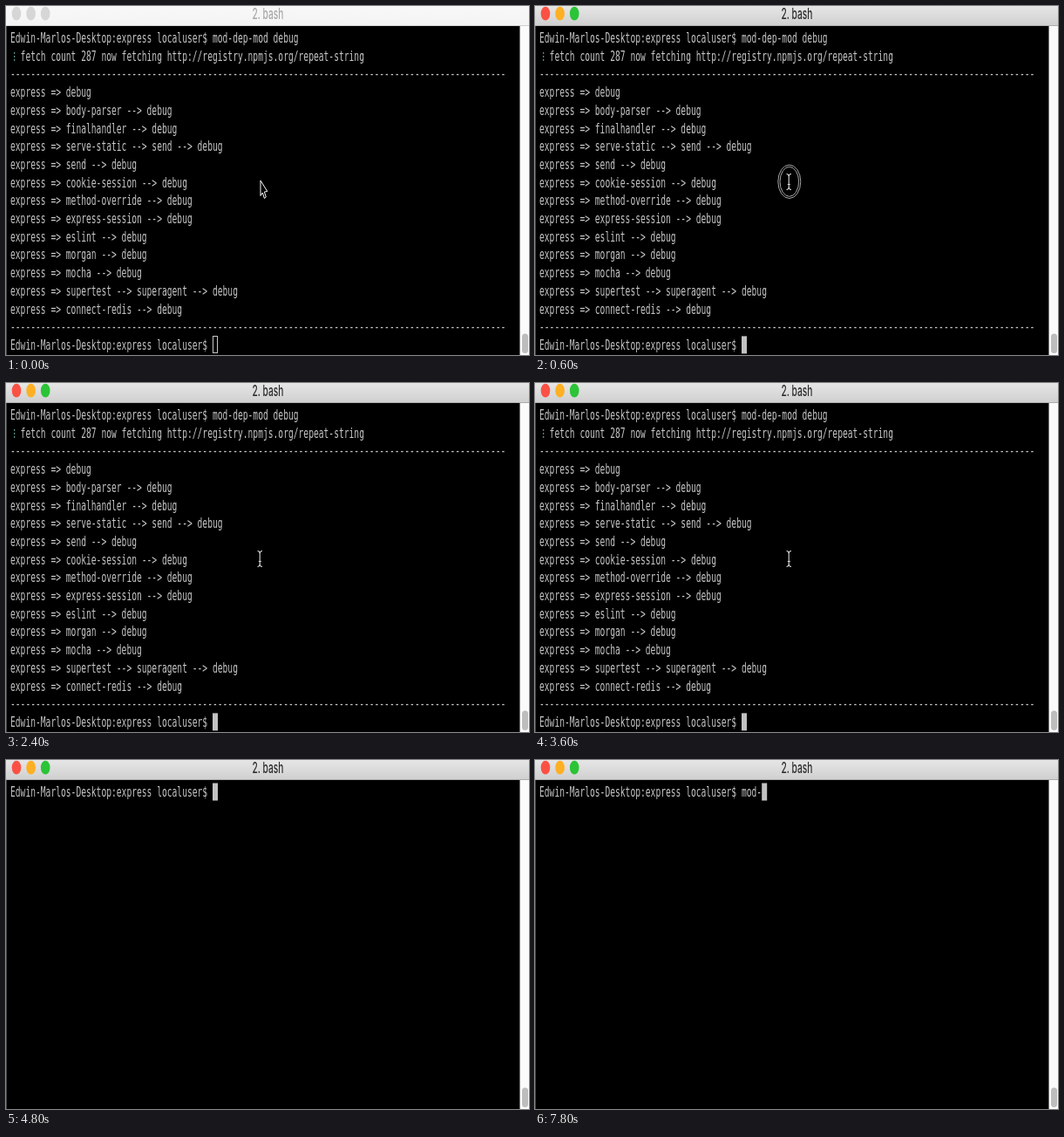
Animation, 600 px wide and 400 px high, one loop 8 s. Source, as an HTML page with a canvas:

```html
<!DOCTYPE html>
<html>
<head>
<meta charset="utf-8">
<style>
html, body { margin: 0; width: 100%; height: 100%; overflow: hidden; background: #000; }
canvas { display: block; }
</style>
</head>
<body>
<canvas id="stage" width="600" height="400"></canvas>
<script>
const ctx = document.getElementById('stage').getContext('2d');
const LOOP = 8000, LEFT = 5, COL = 5.8, ROW = 20.7, NARROW = 0.602;
const INK = '#c6c6c6', PALE = '#fbfbfb';
const MONO = '16px "DejaVu Sans Mono", monospace';
const SANS = '500 17px Inter, sans-serif';
const PROMPT = 'Edwin-Marlos-Desktop:express localuser$ ';
const RULE = '-'.repeat(98);
const PATHS = [
  'debug', 'body-parser --> debug', 'finalhandler --> debug',
  'serve-static --> send --> debug', 'send --> debug',
  'cookie-session --> debug', 'method-override --> debug',
  'express-session --> debug', 'eslint --> debug', 'morgan --> debug',
  'mocha --> debug', 'supertest --> superagent --> debug',
  'connect-redis --> debug'
];
const OUTPUT = [
  PROMPT + 'mod-dep-mod debug',
  '  fetch count 287 now fetching http://registry.npmjs.org/repeat-string',
  RULE, ...PATHS.map(p => 'express => ' + p), RULE
];
const KEY_TIMES = [6200, 6400, 6600, 7400];

function rect(x, y, w, h, color) {
  ctx.fillStyle = color;
  ctx.fillRect(x, y, w, h);
}

function ellipse(x, y, rx, ry) {
  ctx.beginPath();
  ctx.ellipse(x, y, rx, ry, 0, 0, 7);
}

function text(str, x, y, font, color, align = 'left') {
  ctx.save();
  ctx.translate(x, y);
  ctx.scale(NARROW, 1);
  ctx.font = font;
  ctx.fillStyle = color;
  ctx.textAlign = align;
  ctx.fillText(str, 0, 0);
  ctx.restore();
}

function titleBar(active) {
  const shade = ctx.createLinearGradient(0, 0, 0, 22);
  shade.addColorStop(0, active ? '#e6e6e6' : '#f8f8f8');
  shade.addColorStop(1, active ? '#d0d0d0' : '#f4f4f4');
  rect(0, 0, 600, 22, shade);
  rect(0, 22, 600, 1, active ? '#acacac' : '#d0d0d0');
  const lights = active ? ['#fb5145', '#fdb024', '#2bc437'] : Array(3).fill('#d6d6d6');
  lights.forEach((color, i) => {
    ellipse(12 + i * 16.6, 8.7, 5.3, 7.9);
    ctx.fillStyle = color;
    ctx.fill();
  });
  text('2. bash', 300.5, 14.7, SANS, active ? '#2c2c2c' : '#a8a8a8', 'center');
}

function scrollBar() {
  rect(589.5, 23, 10.5, 377, PALE);
  ctx.fillStyle = '#bdbdbd';
  ctx.beginPath();
  ctx.roundRect(592, 375.5, 7, 22.5, 3.5);
  ctx.fill();
}

function caret(col, row, filled) {
  const x = LEFT + col * COL, y = 26.5 + row * ROW;
  if (filled) return rect(x, y, 6, 20, '#c2c2c2');
  ctx.strokeStyle = INK;
  ctx.lineWidth = 1;
  ctx.strokeRect(Math.round(x) + .5, Math.round(y) + .5, 5, 19);
}

function arrow() {
  ctx.beginPath();
  [[292, 200], [292, 217.5], [294.4, 214], [296.4, 220.5], [298.3, 219], [296.4, 213], [299.8, 212.5]]
    .forEach(p => ctx.lineTo(...p));
  ctx.closePath();
  ctx.fillStyle = '#000';
  ctx.fill();
  ctx.strokeStyle = PALE;
  ctx.lineWidth = 1;
  ctx.stroke();
}

function iBeam() {
  ctx.strokeStyle = '#dadada';
  ctx.lineWidth = 1.1;
  ctx.stroke(new Path2D('M288.5 192.5Q291.2 192.5 291.2 196V207Q291.2 210.5 288.5 210.5' +
    'M294 192.5Q291.2 192.5 291.2 196M291.2 207Q291.2 210.5 294 210.5M289.8 204.5H292.8'));
}

function clickRing() {
  ctx.strokeStyle = '#a6a6a6';
  ctx.lineWidth = 1;
  for (const inset of [0, 2.2]) {
    ellipse(291.8, 201.3, 13 - inset, 19.2 - inset);
    ctx.stroke();
  }
}

function draw(t) {
  const active = t >= 400, cleared = t >= 4800;
  const typed = 'mod-'.slice(0, KEY_TIMES.filter(k => t >= k).length);
  const lines = cleared ? [PROMPT + typed] : [...OUTPUT, PROMPT];

  rect(0, 0, 600, 400, '#000');
  rect(0, 23, 1, 377, '#484848');
  titleBar(active);
  scrollBar();
  lines.forEach((line, row) => text(line, LEFT, 42 + row * ROW, MONO, INK));
  if (!cleared) for (let i = 0; i < 3; i++) rect(9, 53 + i * 4, 1.3, 1.8, '#5c9c94');
  caret(lines.at(-1).length, lines.length - 1, active);

  if (!active) arrow();
  else if (t < 4400) iBeam();
  if (active && t < 800) clickRing();
}

const start = performance.now();
function tick() {
  draw((performance.now() - start) % LOOP);
  requestAnimationFrame(tick);
}
tick();
</script>
</body>
</html>
```
